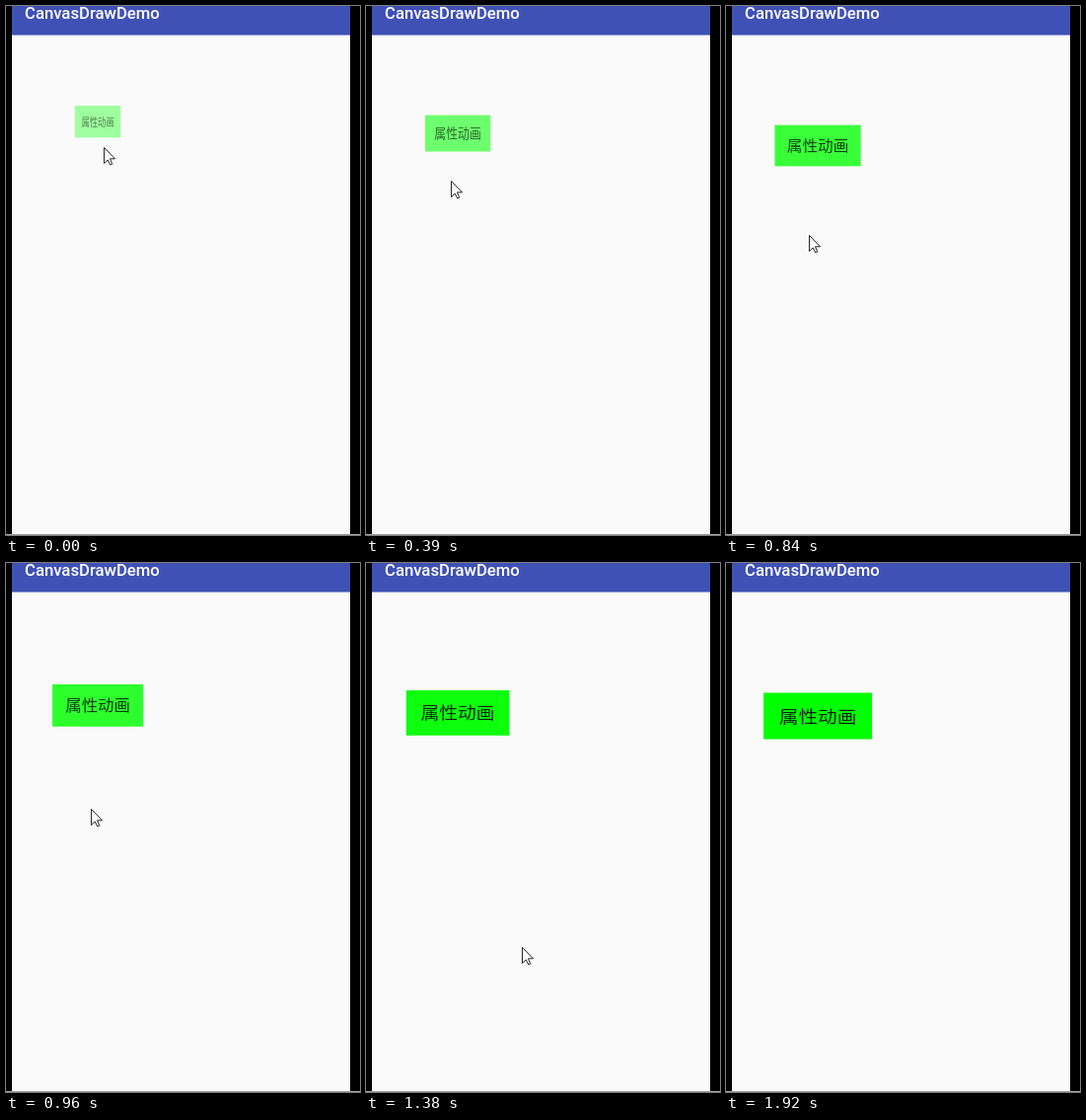
These frames come from a looping animation (359x536 px, 3230 ms). An HTML page with a canvas:

```html
<!DOCTYPE html>
<html lang="zh">
<head>
<meta charset="utf-8">
<style>
html, body { margin: 0; width: 100%; height: 100%; overflow: hidden; background: #000; }
canvas { display: block; }
</style>
</head>
<body>
<canvas id="stage" width="359" height="536"></canvas>
<script>
const ctx = document.getElementById('stage').getContext('2d');
const LOOP = 3230;
const END = 1920;

// Pointer key points: time in ms, x, y
const path = [
  [0, 99, 143], [390, 86, 177], [690, 81, 210], [960, 86, 249],
  [1380, 158, 389], [1500, 233, 470], [1770, 324, 534]
];
const arrow = new Path2D('M.5 .5V16.5L4.2 13L6.8 18L8.7 17.2L6.5 11.8H11.5Z');

function heldTime(t) {
  let start = 0;
  for (let k = 0; start < END; k++) {
    const long = k < 6 ? k > 1 : k % 2;
    const next = start + (long ? 150 : 120);
    if (next > t) break;
    start = next;
  }
  return start;
}

function rect(color, x, y, w, h) {
  ctx.fillStyle = color;
  ctx.fillRect(x, y, w, h);
}

function drawScreen() {
  rect('#000', 0, 0, 359, 536);
  rect('#fafafa', 6, 0, 343, 535);
  rect('#3f51b5', 6, 0, 343, 29.5);
  rect('#a0a0a0', 0, 535, 359, 1);
  ctx.fillStyle = '#fff';
  ctx.font = '500 16.7px Roboto, sans-serif';
  ctx.textAlign = 'left';
  ctx.fillText('CanvasDrawDemo', 19, 13);
}

function drawButton(time) {
  const p = Math.min(1, 0.45 + time * 0.000297);
  const s = (1 - Math.cos(Math.PI * p)) / 2; // accelerate, then decelerate
  const w = 110 * s;
  const h = 21.5 + 25.5 * s;
  const fade = Math.round(274 * (1 - s));
  ctx.save();
  ctx.translate(93.1, 89.6 + 65.4 * s);
  rect(`rgb(${fade},255,${fade})`, -w / 2, -h / 2, w, h);
  ctx.scale(w / 95, h / 47);
  ctx.fillStyle = `rgba(0,0,0,${0.2 + 0.67 * s})`;
  ctx.font = '17px "Noto Sans CJK SC", "Noto Sans CJK", sans-serif';
  ctx.textAlign = 'center';
  ctx.fillText('属性动画', 0, 6.5);
  ctx.restore();
}

function drawPointer(time) {
  const i = path.findIndex(key => key[0] > time);
  const [t1, x1, y1] = path.at(i);
  const [t0, x0, y0] = path.at(i < 0 ? -2 : i - 1);
  const u = (time - t0) / (t1 - t0);
  ctx.save();
  ctx.translate(Math.round(x0 + (x1 - x0) * u), Math.round(y0 + (y1 - y0) * u));
  ctx.fillStyle = '#fff';
  ctx.strokeStyle = '#000';
  ctx.lineWidth = 0.85;
  ctx.fill(arrow);
  ctx.stroke(arrow);
  ctx.restore();
}

function frame(now) {
  const time = heldTime(now % LOOP);
  drawScreen();
  drawButton(time);
  if (time < END) drawPointer(time);
  requestAnimationFrame(frame);
}
requestAnimationFrame(frame);
</script>
</body>
</html>
```
